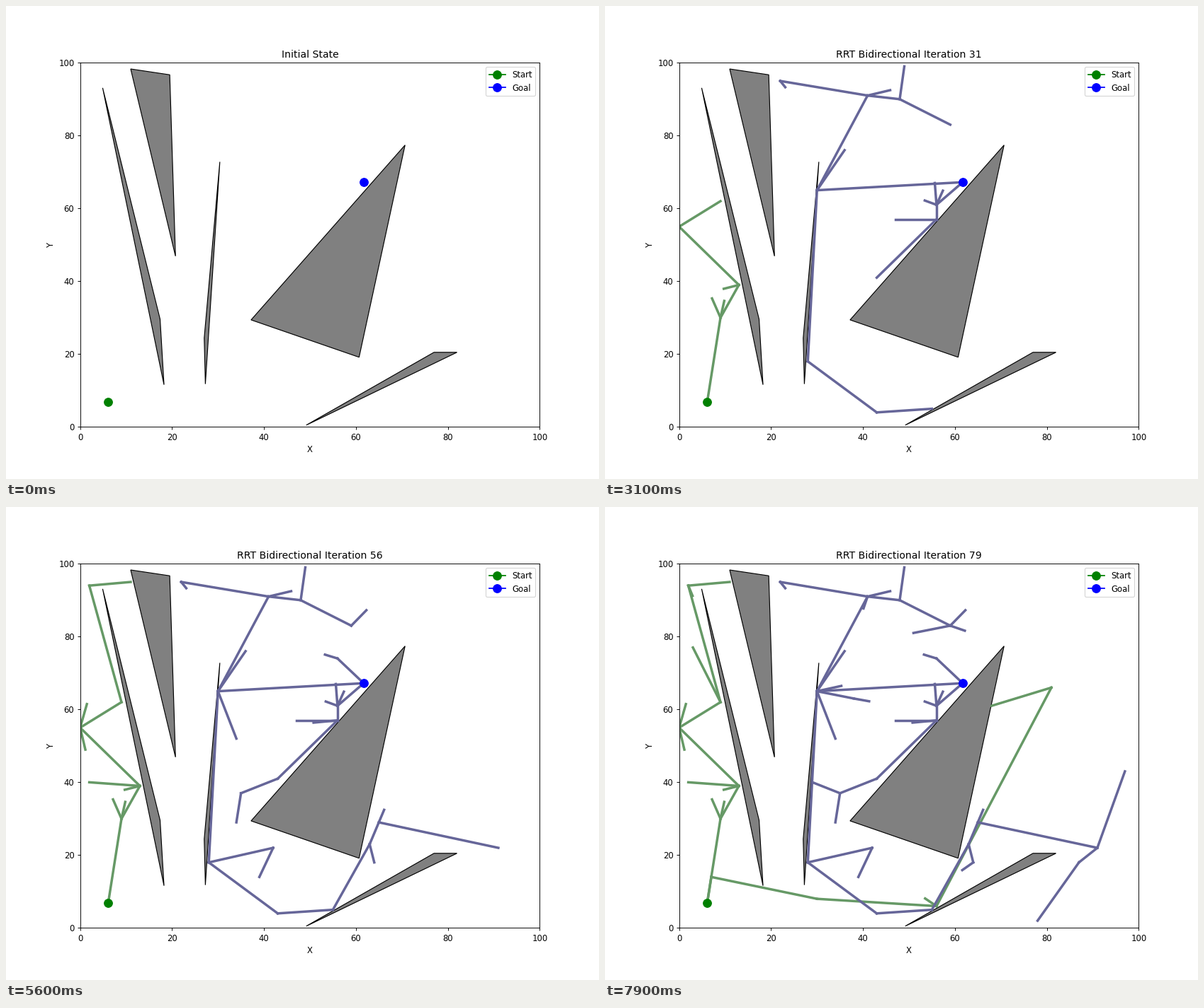
Write a matplotlib script that moves like this. It is 837x669 px and loops after 8 s.

```python
import math
import random

import matplotlib.pyplot as plt
import numpy as np
from matplotlib.animation import FuncAnimation
from matplotlib.path import Path

W, H = 837, 669
DPI = W / 10  # ten inches wide
STEPS, INTERVAL = 80, 100

START, GOAL = (6.1, 6.8), (61.7, 67.2)

OBSTACLES = [
    [(4.9, 93.1), (17.4, 29.6), (18.25, 11.6)],
    [(11.0, 98.3), (19.5, 96.7), (20.75, 46.9)],
    [(30.4, 72.8), (27.0, 24.4), (27.25, 11.8)],
    [(70.7, 77.4), (60.7, 19.15), (37.2, 29.4)],
    [(49.2, 0.5), (77.0, 20.5), (82.0, 20.5)],
]

# bursts of growth: first and last iteration, points reached at an even pace
START_BURSTS = [
    (1, 19, [(9, 30), (13, 39), (0, 55), (9, 62)]),
    (37, 57, [(2, 94), (11, 95), (2, 40), (3, 77)]),
    (66, 79, [(7, 14), (30, 8), (56, 6), (81, 66), (68, 61)]),
]
GOAL_BURSTS = [
    (2, 17, [(30, 65), (41, 91), (22, 95), (48, 90), (56, 61), (28, 18),
             (36, 76), (49, 99), (56, 57)]),
    (20, 29, [(43, 41), (59, 83), (43, 4), (47, 57), (55, 5)]),
    (32, 44, [(42, 22), (63, 23), (35, 37), (65, 29), (64, 18), (91, 22),
              (56, 74)]),
    (48, 54, [(34, 29), (39, 14), (34, 52)]),
    (57, 73, [(51, 81), (87, 18), (29, 40), (78, 2), (38, 63), (97, 43)]),
]


def branches(root, bursts):
    """Join each point to the nearest node; list (iteration, parent, node)."""
    nodes, edges = [root], []
    for first, last, points in bursts:
        for step, p in zip(np.linspace(first, last, len(points)), points):
            edges.append((round(step), min(nodes, key=lambda n: math.dist(n, p)), p))
            nodes.append(p)
    return edges


def is_free(a, b):
    edge = Path([a, b])
    return (0 <= min(b) and max(b) <= 100
            and not any(Path(c + c[:1]).intersects_path(edge) for c in OBSTACLES))


def twigs(edges, count, rng):
    """Short random side shoots that stay clear of the obstacles."""
    shoots = []
    for step in np.linspace(7, STEPS - 1, count).round():
        grown = [node for t, _, node in edges if t < step]
        for _ in range(50):
            a = rng.choice(grown)
            angle, size = rng.uniform(0, math.tau), rng.uniform(2, 7)
            b = (a[0] + size * math.cos(angle), a[1] + size * math.sin(angle))
            if is_free(a, b):
                shoots.append((step, a, b))
                break
    return shoots


# the tiny margin keeps the pixel size from being rounded down
fig, ax = plt.subplots(figsize=((W + 1e-6) / DPI, (H + 1e-6) / DPI), dpi=DPI)
ax.set(xlim=(0, 100), ylim=(0, 100), xlabel="X", ylabel="Y")
title = ax.set_title("Initial State")

for corners in OBSTACLES:
    ax.add_patch(plt.Polygon(corners, facecolor="gray", edgecolor="black", lw=1))

rng = random.Random(4)
lines = []
for root, bursts, count, color in ((START, START_BURSTS, 7, "#669966"),
                                   (GOAL, GOAL_BURSTS, 14, "#666699")):
    edges = branches(root, bursts)
    for step, a, b in edges + twigs(edges, count, rng):
        line, = ax.plot((a[0], b[0]), (a[1], b[1]), color=color, lw=3)
        lines.append((step, line))

for point, color, label in ((START, "green", "Start"), (GOAL, "blue", "Goal")):
    ax.plot(*point, "o-", color=color, markersize=10, label=label, zorder=3)
ax.legend(loc="upper right")


def update(i):
    title.set_text(f"RRT Bidirectional Iteration {i}" if i else "Initial State")
    for step, line in lines:
        line.set_visible(step <= i)
    return [title] + [line for _, line in lines]


anim = FuncAnimation(fig, update, frames=STEPS, interval=INTERVAL,
                     repeat=True, repeat_delay=0, blit=False)
plt.show()
```
